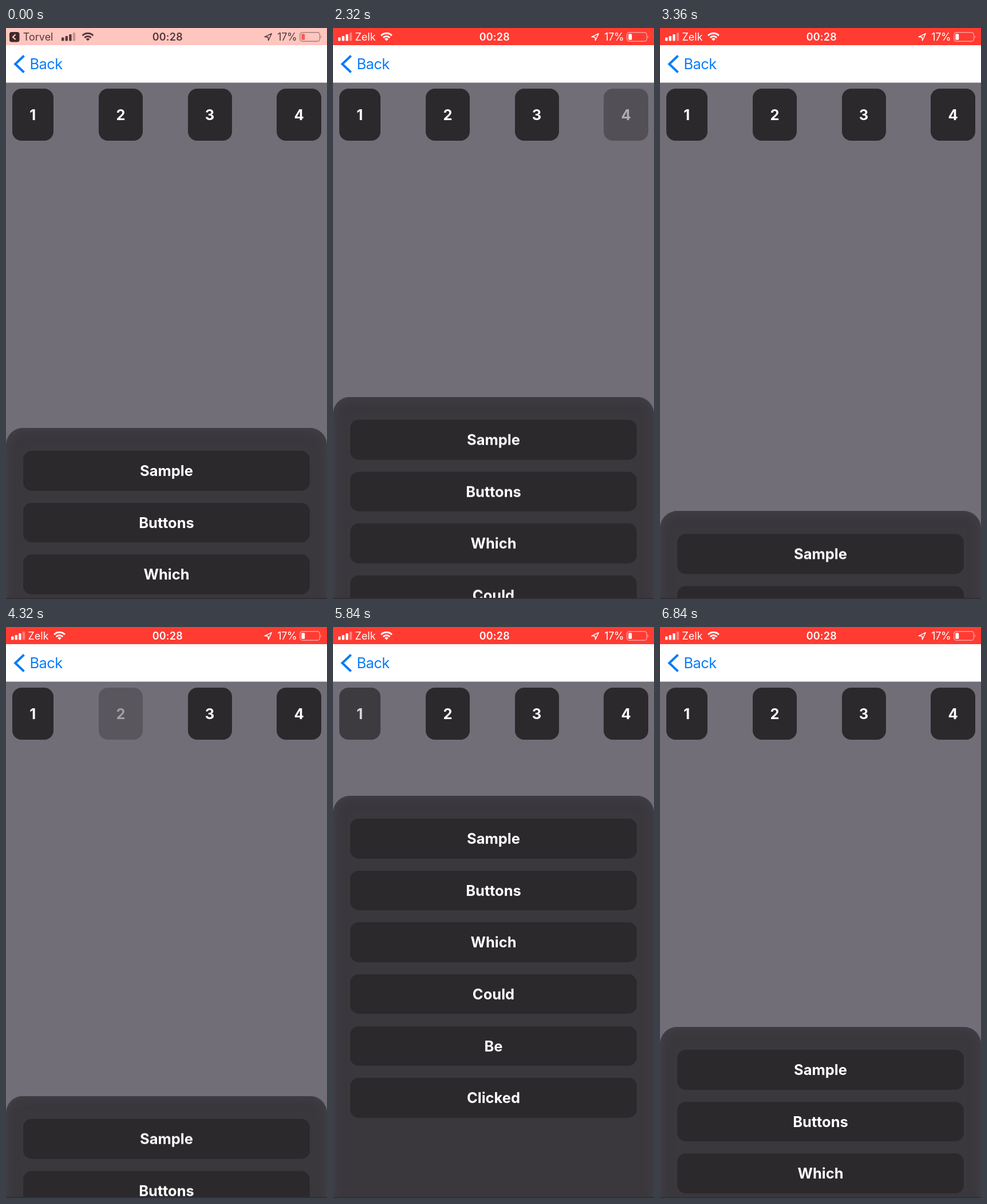
Recreate the animation shown at these times as an HTML page. Size 561 px wide and 998 px high, loop 6920 ms.

```html
<!DOCTYPE html>
<html lang="en">
<head>
<meta charset="utf-8">
<title>Bottom sheet</title>
<style>
  html, body { margin: 0; width: 100%; height: 100%; overflow: hidden; }
  body { position: relative; background: #716e77; font-family: Inter, Roboto, sans-serif; }
  svg { position: absolute; left: 0; top: 0; }

  .key, .row {
    position: absolute; box-sizing: border-box; border-radius: 15px;
    background: #2b292c; color: #fff;
    font-size: 25.5px; font-weight: 650; text-align: center;
  }
  .key { top: 106px; height: 91px; line-height: 92px; border-radius: 16px; }
  .k1 { left: 10.5px; width: 72.5px; animation: tap1 6920ms ease-in-out infinite; }
  .k2 { left: 162px; width: 77px; animation: tap2 6920ms ease-in-out infinite; }
  .k3 { left: 317.5px; width: 77px; }
  .k4 { left: 473px; width: 78px; animation: tap4 6920ms ease-in-out infinite; }

  .sheet {
    position: absolute; left: 0; top: 699px; width: 561px; height: 900px;
    border-radius: 30px 30px 0 0; background: #3a383d;
    box-shadow: inset 0 0 20px #45434d;
    animation: slide 6920ms ease-in-out infinite;
  }
  .row {
    left: 30px; width: 501px; height: 69.5px; line-height: 70.5px;
    top: calc(40.3px + 90.55px * var(--i));
  }
  .base { position: absolute; left: 0; bottom: 0; width: 100%; height: 2px; background: #312f35; }

  .low { animation: alert 6920ms linear infinite; }

  @keyframes alert {
    0%, .29% { opacity: 0; }
    3.47%, 100% { opacity: 1; }
  }
  /* Each key snaps the sheet to its own height: 1 low, 2 resting, 4 tall. */
  @keyframes slide {
    0%, 31.79% { transform: translateY(0); }
    39.02%, 41.76% { transform: translateY(-449px); }
    48.99%, 60.25% { transform: translateY(149.3px); }
    67.47%, 71.68% { transform: translateY(0); }
    78.9%, 83.02% { transform: translateY(-449px); }
    90.25%, 91.47% { transform: translateY(149.3px); }
    98.7%, 100% { transform: translateY(0); }
  }
  @keyframes tap1 {
    0%, 40.32%, 47.69%, 82.23%, 90.25%, 100% { opacity: 1; }
    41.76% { opacity: .3; }
    83.02% { opacity: .72; }
  }
  @keyframes tap2 {
    0%, 58.67%, 67.47%, 90.32%, 97.54%, 100% { opacity: 1; }
    60.25% { opacity: .18; }
    91.47% { opacity: .3; }
  }
  @keyframes tap4 {
    0%, 31.21%, 37.57%, 70.23%, 78.9%, 100% { opacity: 1; }
    31.79%, 71.68% { opacity: .3; }
  }
</style>
</head>
<body>
<div class="key k1">1</div>
<div class="key k2">2</div>
<div class="key k3">3</div>
<div class="key k4">4</div>

<div class="sheet">
  <div class="row" style="--i:0">Sample</div>
  <div class="row" style="--i:1">Buttons</div>
  <div class="row" style="--i:2">Which</div>
  <div class="row" style="--i:3">Could</div>
  <div class="row" style="--i:4">Be</div>
  <div class="row" style="--i:5">Clicked</div>
</div>
<div class="base"></div>

<svg width="561" height="96" viewBox="0 0 561 96" font-size="18">
  <defs>
    <g id="signal" fill="currentColor">
      <rect x="0" y="16.5" width="4.4" height="6" rx="1"/>
      <rect x="6.6" y="14" width="4.4" height="8.5" rx="1"/>
      <rect x="13.2" y="11" width="4.4" height="11.5" rx="1"/>
      <rect x="19.8" y="8" width="4.4" height="14.5" rx="1" opacity=".35"/>
    </g>
    <g id="wifi" fill="none" stroke="currentColor" stroke-width="3">
      <path d="M-9.4 13.2A13.3 13.3 0 0 1 9.4 13.2"/>
      <path d="M-5.7 17A8 8 0 0 1 5.7 17"/>
      <path d="M-3.3 19.2A4.7 4.7 0 0 1 3.3 19.2L0 22.5Z" fill="currentColor" stroke="none"/>
    </g>
    <g id="right" fill="currentColor">
      <text x="282.3" y="21.8" text-anchor="middle" font-weight="600" letter-spacing=".2">00:28</text>
      <path d="M452 15.6L464.2 9.8L458.6 21.8L458 16Z" fill="none" stroke="currentColor" stroke-width="1.5" stroke-linejoin="round"/>
      <text x="508.5" y="21.8" text-anchor="end" letter-spacing="-.3">17%</text>
      <rect x="513.8" y="7.8" width="34.6" height="15.4" rx="4.2" fill="none" stroke="currentColor" stroke-width="1.4" opacity=".5"/>
      <path d="M550 13Q552.3 15.5 550 18Z" opacity=".55"/>
    </g>
    <rect id="charge" x="516.3" y="10.2" width="6" height="10.6" rx="1.6"/>
  </defs>

  <rect y="29" width="561" height="66.5" fill="#fff"/>
  <path d="M31.5 48.5L16.2 63L31.5 77.5" fill="none" stroke="#087cfb" stroke-width="4"/>
  <text x="41.5" y="72" font-size="25.5" letter-spacing="-.6" fill="#087cfb">Back</text>

  <rect width="561" height="30" fill="#ffc6c0"/>
  <g color="#553839">
    <rect x="6" y="7" width="17.5" height="17.5" rx="4" fill="#3f2829"/>
    <path d="M16.7 11.3L12 15.7L16.7 20.1" fill="none" stroke="#ffc6c0" stroke-width="2.2"/>
    <text x="29.8" y="21.8" fill="currentColor">Torvel</text>
    <use href="#signal" x="97"/>
    <use href="#wifi" x="143"/>
    <use href="#right"/>
    <use href="#charge" fill="#ff5a4f"/>
  </g>

  <g class="low" color="#fff">
    <rect width="561" height="30" fill="#ff3b32"/>
    <use href="#signal" x="9"/>
    <text x="38.5" y="21.8" fill="currentColor">Zelk</text>
    <use href="#wifi" x="93.5"/>
    <use href="#right"/>
    <use href="#charge" fill="#fff"/>
  </g>
</svg>
</body>
</html>
```
